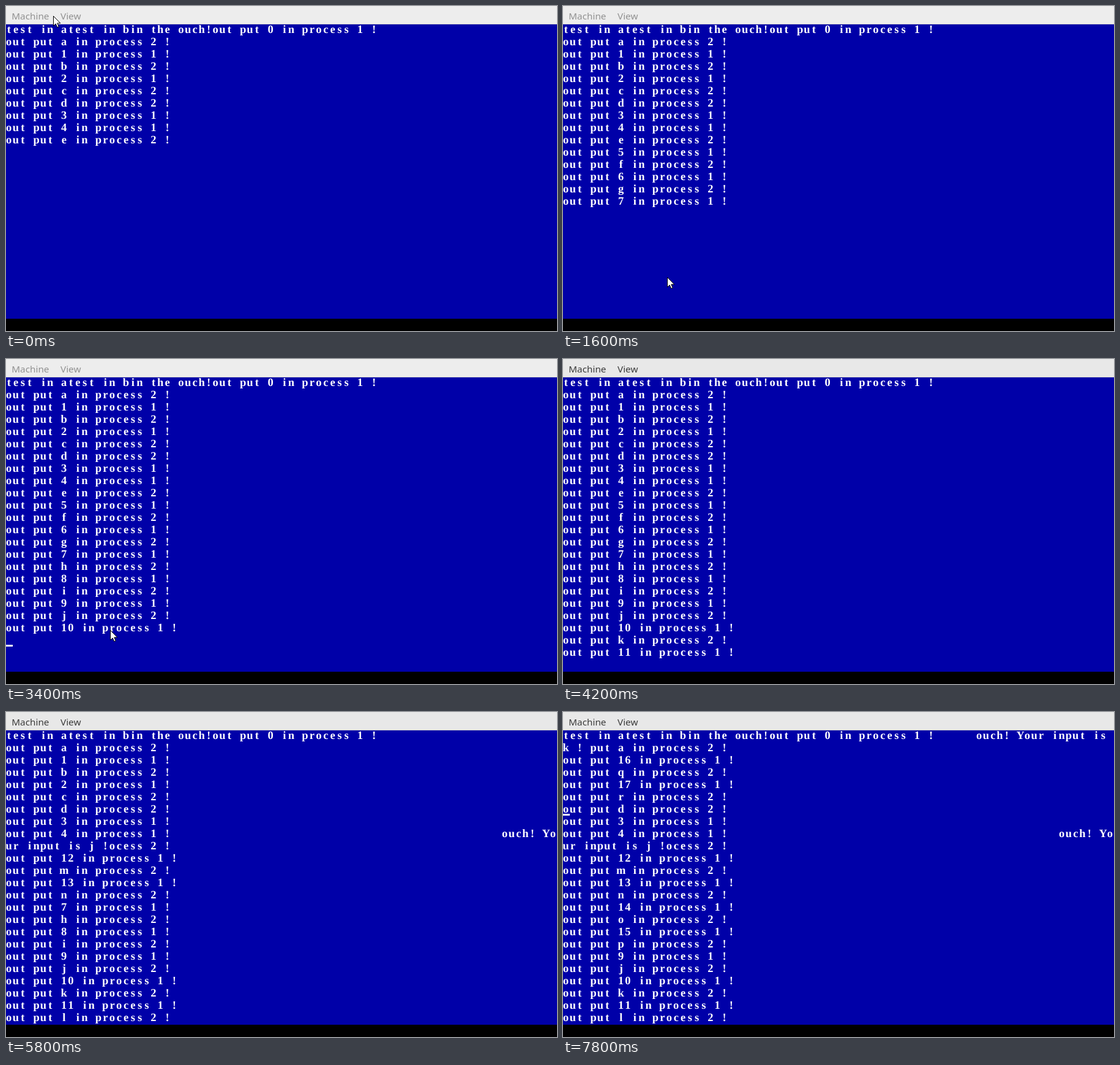
These frames come from a looping animation (900 by 530 pixels, 8 s). An HTML page:

```html
<!DOCTYPE html>
<html lang="en">
<head>
<meta charset="utf-8">
<title>Two processes in a terminal</title>
<style>
  html, body { margin: 0; width: 100%; height: 100%; overflow: hidden; background: #000; }
  #stage { position: relative; width: 900px; height: 530px; overflow: hidden; background: #000; }
  #menu {
    position: absolute; inset: 0 0 auto; height: 29px; border-bottom: 1px solid #cfcfcf;
    font: 15.3px/30px "Noto Sans", "Open Sans", sans-serif;
  }
  #menu span { position: absolute; top: 1px; }
  #screen { position: absolute; top: 30px; width: 900px; height: 480px; overflow: hidden; background: #0000a8; }
  #text {
    position: absolute; left: -0.9px; top: -1.2px; margin: 0; color: #fff;
    font: bold 18.5px/20px "Liberation Serif", "Noto Serif", serif;
    text-rendering: geometricPrecision;
  }
  #text div { display: flex; height: 20px; }
  #text span { flex: none; display: flex; justify-content: center; width: 11.25px; white-space: pre; }
  #caret { position: absolute; left: 0; width: 11.25px; height: 2.5px; background: #fff; }
  #pointer { position: absolute; left: 0; top: 0; overflow: visible; }
</style>
</head>
<body>
<div id="stage">
  <div id="menu"><span style="left:9.2px">Machine</span><span style="left:89px">View</span></div>
  <div id="screen"><div id="text"></div><div id="caret"></div></div>
  <svg id="pointer" width="14" height="21">
    <path d="M.5 .5V16.5L4.2 13L6.7 18.7L9.2 17.6L6.8 12H11.8Z" fill="#fff" stroke="#000"/>
  </svg>
</div>
<script>
const LOOP = 8000, FRAME = 200 / 3, COLS = 80, ROWS = 24;
const $ = id => document.getElementById(id);

// Labels already printed when the loop starts.
const INITIAL = [..."a1b2cd34e"];

// [time, label]; a key press also carries the cell its message starts in.
const OUTPUT = [
  [400, "5"], [600, "f"], [930, "6"], [1130, "g"], [1470, "7"], [1730, "h"],
  [2200, "8"], [2330, "i"], [2670, "9"], [2800, "j"], [3400, "10"], [3930, "k"],
  [4070, "11"], [4270, "l"], [4470, "j", 8 * COLS + 72], [4600, "12"], [4800, "m"],
  [5270, "13"], [5470, "n"], [5870, "14"], [6070, "o"], [6530, "15"], [6600, "p"],
  [6670, "k", 60], [7270, "16"], [7270, "q"], [7730, "17"], [7800, "r"]
];

// The caret turns on at even entries and off at odd ones.
const BLINK = [
  70, 330, 600, 870, 1130, 1400, 1670, 2000, 2270, 2530, 2800, 3070, 3330, 3600, 3870,
  4130, 4470, 4730, 5000, 5270, 5530, 5800, 6070, 6330, 6670, 7000, 7270, 7530, 7800
];

// Pointer path: time, x, y.
const PATH = [
  [267, 77, 16], [400, 86, 3], [467, 97, 42], [667, 124, 296], [800, 124, 296],
  [1000, 150, 398], [1200, 164, 443], [1333, 169, 450], [1533, 170, 442]
];

const processLine = label => `out put ${label} in process ${/\d/.test(label) ? 1 : 2} !`;

function terminal(t) {
  const cells = Array(COLS * ROWS).fill(" ");
  let row = 0;
  const write = (at, s) => {
    [...s].forEach((c, i) => { cells[at + i] = c; });
    row = Math.floor((at + s.length) / COLS) + 1;
  };
  write(0, "test in atest in bin the ouch!" + processLine("0"));
  INITIAL.forEach(label => write(row * COLS, processLine(label)));
  for (const [time, label, at] of OUTPUT) {
    if (time > t) break;
    if (at === undefined) write(row * COLS, processLine(label));
    else write(at, `ouch! Your input is ${label} !`);
  }
  const lines = Array.from({ length: ROWS }, (_, r) =>
    cells.slice(r * COLS, (r + 1) * COLS).join("").trimEnd());
  return { lines, row };
}

function pointerAt(t) {
  const next = PATH.findIndex(p => p[0] > t);
  if (next === 0) return PATH[0].slice(1);
  if (next < 0) return PATH[PATH.length - 1].slice(1);
  const a = PATH[next - 1], b = PATH[next];
  const k = (t - a[0]) / (b[0] - a[0]);
  return [1, 2].map(i => Math.round(a[i] + (b[i] - a[i]) * k));
}

const grey = (from, to, k) => {
  const v = Math.round(from + (to - from) * k);
  return `rgb(${v}, ${v}, ${v})`;
};

// One element per line, one fixed cell per character.
const shown = [];
const rows = Array.from({ length: ROWS }, () => $("text").appendChild(document.createElement("div")));
function showLine(line, r) {
  if (line === shown[r]) return;
  shown[r] = line;
  rows[r].replaceChildren(...[...line].map(c => {
    const cell = document.createElement("span");
    cell.textContent = c;
    return cell;
  }));
}

function draw(t) {
  const { lines, row } = terminal(t);
  lines.forEach(showLine);

  const toggles = BLINK.filter(time => time <= t).length;
  $("caret").style.visibility = toggles % 2 ? "visible" : "hidden";
  $("caret").style.top = row * 20 + 16.25 + "px";

  const step = Math.floor((t + 4) / FRAME) * FRAME;
  const [x, y] = pointerAt(step + 0.5);
  $("pointer").style.transform = `translate(${x}px, ${y}px)`;
  $("pointer").style.visibility = t < 3600 ? "visible" : "hidden";

  // The click gives the window focus and darkens its menu.
  const focus = Math.min(1, Math.max(0, (step - 3533) / 200));
  $("menu").style.color = grey(146, 60, focus);
  $("menu").style.background = grey(237, 232, focus);
}

const start = performance.now();
function tick() {
  draw((performance.now() - start) % LOOP);
  requestAnimationFrame(tick);
}
tick();
</script>
</body>
</html>
```
